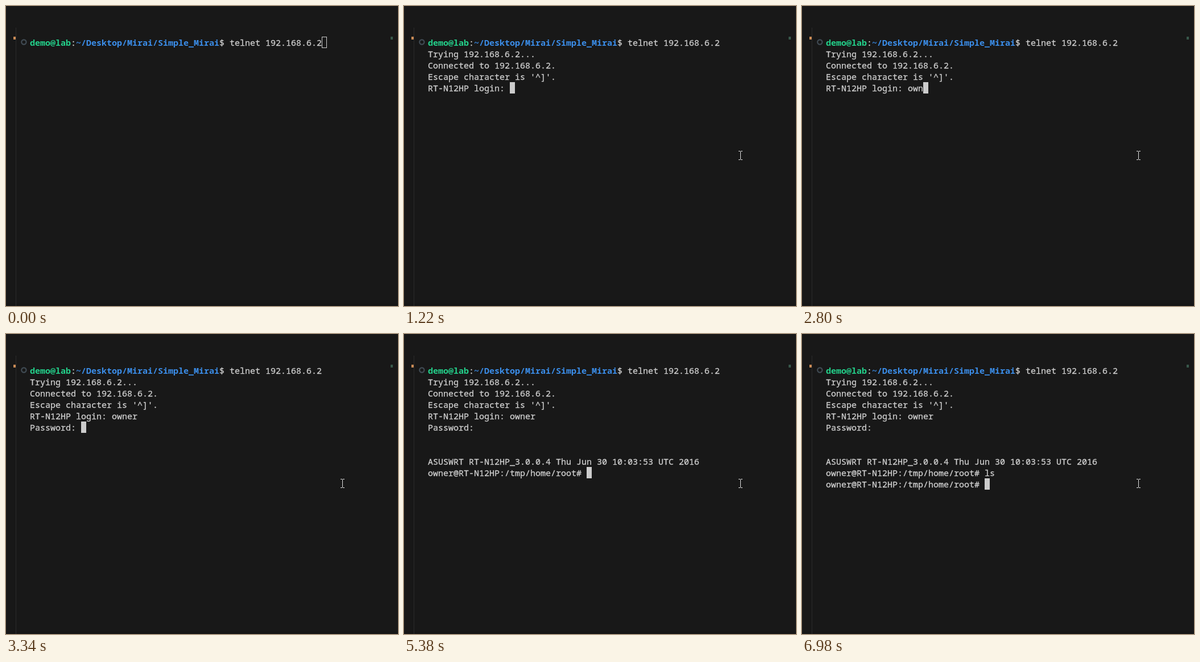
An HTML page that plays this animation: 689x528 px, repeating every 8000 ms.

```html
<!DOCTYPE html>
<html lang="en">
<head>
<meta charset="utf-8">
<title>Terminal session</title>
<style>
  html, body { margin: 0; width: 100%; height: 100%; overflow: hidden; background: #181818; }
  svg { display: block; }
  text { font: 15px "Noto Sans Mono", "DejaVu Sans Mono", monospace; fill: #d0d0d0; stroke: #d0d0d0; stroke-width: .3px; white-space: pre; font-variant-ligatures: none; }
  .user, .path { font-weight: 700; stroke: none; }
  .user { fill: #23d18b; }
  .path { fill: #3b8eea; }
</style>
</head>
<body>
<svg width="689" height="528" viewBox="0 0 689 528">
  <rect width="689" height="528" fill="#181818"/>
  <rect y="524" width="689" height="4" fill="#161616"/>
  <rect x="17" y="38" width="1" height="490" fill="#2b2b2b"/>
  <rect x="13" y="54" width="4" height="5" fill="#c98a55"/>
  <rect x="676" y="54" width="4" height="5" fill="#37574a"/>
  <circle cx="31.4" cy="63.5" r="4.1" fill="none" stroke="#414c55" stroke-width="2.2"/>
  <text x="42" y="70"><tspan class="user">demo@lab</tspan>:<tspan class="path">~/Desktop/Mirai/Simple_Mirai</tspan>$ telnet 192.168.6.2</text>
  <g id="rows"></g>
  <rect id="caret" stroke="#ccc"/>
  <path id="pointer" d="M-3.5 -7.5H-.5M.5 -7.5H3.5M0 -7V7M-3.5 7.5H-.5M.5 7.5H3.5" fill="none" stroke="#e0e0e0"/>
</svg>
<script>
const LOOP = 8000, LEFT = 42, TOP = 54, COL = 9, ROW = 20, COMMAND_COLS = 57;
const shell = "owner@RT-N12HP:/tmp/home/root# ";

// Terminal output: [time in ms, text appended]
const output = [
  [1120, "\nTrying 192.168.6.2...\nConnected to 192.168.6.2.\nEscape character is '^]'.\n"],
  [1220, "RT-N12HP login: "],
  [2370, "o"], [2570, "w"], [2800, "n"], [3080, "e"], [3110, "r"],
  [3340, "\nPassword: "],
  [5310, "\n"],
  [5340, "\n\nASUSWRT RT-N12HP_3.0.0.4 Thu Jun 30 10:03:53 UTC 2016\n"],
  [5380, shell],
  [6940, "l"],
  [6980, "s\n" + shell]
];

const move = { start: 150, end: 490, steps: 8, from: [686, 503], to: [591.5, 263] };

const rowGroup = document.getElementById("rows");
const caret = document.getElementById("caret");
const pointer = document.getElementById("pointer");

rowGroup.innerHTML = Array.from({ length: 10 }, (_, i) =>
  `<text x="${LEFT}" y="${TOP + 16 + (i + 1) * ROW}"></text>`).join("");
const rows = [...rowGroup.children];

function setText(node, value) {
  if (node.textContent !== value) node.textContent = value;
}

function drawTerminal(t) {
  const shown = output.filter(([time]) => time <= t).map(([, text]) => text).join("");
  const lines = shown.split("\n");
  rows.forEach((row, i) => setText(row, lines[i + 1] || ""));

  const last = lines.length - 1;
  const col = last ? lines[last].length : COMMAND_COLS;
  caret.setAttribute("x", LEFT + col * COL + 0.5);
  caret.setAttribute("y", TOP + last * ROW + 0.5);
  caret.setAttribute("width", COL - 1);
  caret.setAttribute("height", ROW - 1);
  caret.setAttribute("fill", t >= move.end ? "#ccc" : "none");
}

function drawPointer(t) {
  const progress = Math.min(1, (t - move.start) / (move.end - move.start));
  const u = Math.floor(progress * move.steps) / move.steps;
  const eased = 1 - (1 - u) ** 2;
  const [x, y] = move.from.map((a, i) => a + (move.to[i] - a) * eased);
  pointer.setAttribute("visibility", t < move.start ? "hidden" : "visible");
  pointer.setAttribute("transform", `translate(${Math.floor(x) + 0.5} ${Math.round(y)})`);
}

function render(t) {
  drawTerminal(t);
  drawPointer(t);
}

const began = performance.now();
function tick() {
  render((performance.now() - began) % LOOP);
  requestAnimationFrame(tick);
}
render(0);
requestAnimationFrame(tick);
</script>
</body>
</html>
```
